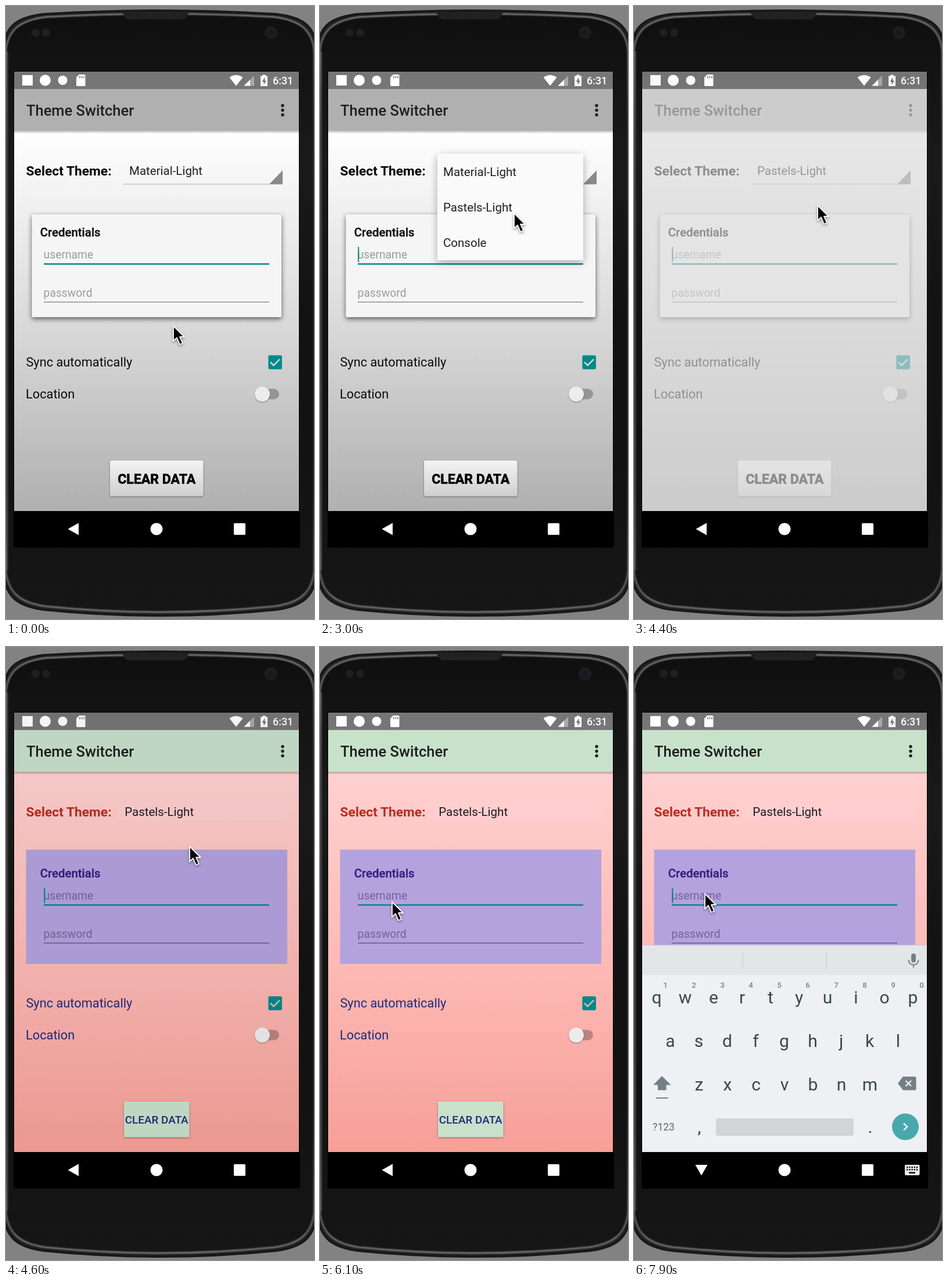
Recreate the animation shown at these times as an HTML page. Size 530 by 1056 pixels, loop 8000 ms.

```html
<!DOCTYPE html>
<html lang="en">
<head>
<meta charset="utf-8">
<title>Theme Switcher</title>
<style>
  html, body { margin: 0; width: 100%; height: 100%; overflow: hidden; background: #828282; }
  svg { display: block; width: 530px; height: 1056px; font-family: Roboto, sans-serif; }
  .card { filter: drop-shadow(0 3px 4px rgba(0, 0, 0, .6)); }
  .button { filter: drop-shadow(0 1.5px 1.5px rgba(0, 0, 0, .4)); }
  .popup { filter: drop-shadow(0 4px 7px rgba(0, 0, 0, .3)); }
  .thumb { filter: drop-shadow(0 1px 1px rgba(0, 0, 0, .35)); }
  .rim { filter: blur(.8px); }
  #pointer { filter: drop-shadow(0 2px 2px rgba(0, 0, 0, .4)); }
</style>
</head>
<body>
<svg id="stage" viewBox="0 0 530 1056"></svg>
<script>
const LOOP = 8000;
const TEAL = '#00898a';

const text = (x, y, size, str, fill, weight = 400, extra = '') =>
  `<text x="${x}" y="${y}" font-size="${size}" font-weight="${weight}" fill="${fill}" ${extra}>${str}</text>`;
const centered = (x, y, size, str, fill, weight, extra = '') =>
  text(x, y, size, str, fill, weight, `text-anchor="middle" ${extra}`);
const rect = (x, y, w, h, fill, extra = '') =>
  `<rect x="${x}" y="${y}" width="${w}" height="${h}" fill="${fill}" ${extra}/>`;
const circle = (x, y, r, fill, extra = '') =>
  `<circle cx="${x}" cy="${y}" r="${r}" fill="${fill}" ${extra}/>`;
const path = (d, fill, extra = '') => `<path d="${d}" fill="${fill}" ${extra}/>`;
const line = (d, color, width, extra = '') =>
  path(d, 'none', `stroke="${color}" stroke-width="${width}" ${extra}`);
const gradient = (id, colors, direction = 'x2="0" y2="1"') =>
  `<linearGradient id="${id}" ${direction}>${colors.map((c, i) =>
    `<stop offset="${i / (colors.length - 1)}" stop-color="${c}"/>`).join('')}</linearGradient>`;

const defs = `<defs>
  ${gradient('lightPage', ['#ffffff', '#dadada', '#b0b0b0'])}
  ${gradient('pastelPage', ['#ffd1d0', '#fdbab6', '#f69f97'])}
  ${gradient('lightButton', ['#f4f4f4', '#cfcfcf'])}
  ${gradient('body', ['#0f0f0f', '#1a1a1a', '#121212', '#121212', '#161616'])}
  ${gradient('rim', ['#8c8c8c', '#3a3a3a', '#303030', '#303030', '#3a3a3a', '#858585'])}
  ${gradient('side', ['#5c5c5c', '#161616'], '')}
  ${gradient('edge', ['rgba(0,0,0,.25)', 'rgba(0,0,0,0)'])}
  <pattern id="mesh" width="4" height="4" patternUnits="userSpaceOnUse">
    ${rect(0, 0, 4, 4, '#161616')}${circle(1, 1, 1, '#343434')}${circle(3, 3, 1, '#343434')}
  </pattern>
  <clipPath id="screen">${rect(14, 113, 490, 757, '#000')}</clipPath>
</defs>`;

function phone() {
  const shell = 'M-3 66C1 34 20 19 66 14Q265 2 464 14C510 19 529 34 533 66V984' +
    'C529 1017 510 1034 464 1040Q265 1060 66 1040C20 1034 1 1017 -3 984Z';
  const rim = 'M0 78C3 41 24 25 68 19Q265 8 462 19C506 25 527 41 530 78V972' +
    'C527 1010 506 1028 462 1034Q265 1054 68 1034C24 1028 3 1010 0 972Z';
  return rect(0, 0, 530, 1056, '#828282') +
    path(shell, '#222', 'stroke="#181818" stroke-width="4"') +
    path(rim, 'url(#body)') +
    rect(0, 78, 5, 894, 'url(#side)') +
    line(rim, 'url(#rim)', 2.4, 'class="rim"') +
    path('M199 10H316L309 21Q307 23 303 23H212Q208 23 206 21Z', 'url(#mesh)') +
    circle(51, 46, 7, '#1f1f1f') + circle(69, 46, 7, '#1f1f1f') +
    circle(456, 46, 11, '#1d1d20') + circle(456, 46, 5, '#17171f') +
    rect(13, 112, 492, 821, '#000');
}

function statusBar() {
  const sd = 'M126 118H135Q136.500 118 136.500 119.500V136.500Q136.500 138 135 138H122.500Q121 138 121 136.500V123Z';
  return rect(14, 113, 490, 30, '#767676') +
    rect(28, 119, 18, 18, '#fff') + circle(67.5, 128, 9.5, '#fff') + circle(97.5, 128, 8, '#fff') +
    path(sd, '#fff') + line('M127 120.500v4M130.500 120.500v4M134 120.500v4', '#767676', 1.5) +
    path('M384.500 123Q396 115 407.500 123L396 137.500Z', '#fff') +
    path('M409.500 137.500L427 120V137.500Z', '#a9a9a9') + path('M409.500 137.500L420 127V137.500Z', '#fff') +
    path('M441.500 118.500H446.500V120.500H450V138H438V120.500H441.500Z', '#fff') +
    path('M445.500 122.500L440.500 130.500H443.500V136L448 128.500H445.500Z', '#767676') +
    text(459, 135, 17.9, '6:31', '#fff', 500);
}

function page(c) {
  const dots = [171.5, 179.5, 187.5].map(y => circle(476, y, 2.7, c.title)).join('');
  return rect(14, 215, 490, 655, `url(#${c.name}Page)`) +
    rect(14, 215, 490, 5, 'url(#edge)') +
    rect(14, 143, 490, 72, c.accent) +
    text(35, 189, 25.5, 'Theme Switcher', c.title, 500) + dots +
    text(34.6, 291.5, 22.8, 'Select Theme:', c.label, 700) +
    c.spinner + c.card +
    text(58.8, 396.5, 20.4, 'Credentials', c.heading, 500, `stroke="${c.heading}" stroke-width=".3"`) +
    text(64.6, 435, 19.3, 'username', c.hint) +
    rect(65, 443.2, 388, 2.5, TEAL) +
    text(64.6, 501, 19.3, 'password', c.hint) +
    rect(65, 509.4, 388, 1.2, c.rule) +
    rect(65.2, 415, 2, 26, TEAL, 'class="caret"') +
    text(34.4, 620.5, 21.8, 'Sync automatically', c.body) +
    rect(451.4, 601.7, 23.5, 24, TEAL, 'rx="2.5"') +
    line('M455 613.500L460.500 619L471 608.500', c.tick, 2.4) +
    text(34, 675.5, 21.8, 'Location', c.body) +
    rect(433, 659.5, 37, 18, c.track, 'rx="9"') +
    circle(441, 668.5, 13, '#ececec', 'class="thumb"') +
    c.button;
}

const light = page({
  name: 'light', accent: '#b0b0b0', title: '#202020', label: '#000', heading: '#0c0c0c',
  hint: '#9c9c9c', rule: '#777', body: '#0c0c0c', tick: '#ddd', track: '#959595',
  spinner: rect(202, 306, 274, 1.5, '#c4c4c4') + path('M476 283V307H453Z', '#8a8a8a') +
    text(212, 291.3, 20.5, 'Material-Light', '#202020', 400, 'id="before"') +
    text(212, 291.3, 20.5, 'Pastels-Light', '#202020', 400, 'id="after"'),
  card: rect(44.5, 359, 429.5, 177, '#f5f5f5', 'rx="2.5" class="card"'),
  button: rect(179, 783, 160.5, 61.5, 'url(#lightButton)', 'rx="3" class="button"') +
    centered(259.2, 823, 23.1, 'CLEAR DATA', '#000', 700, 'stroke="#000" stroke-width=".6"')
});

const pastel = page({
  name: 'pastel', accent: '#c8e1cb', title: '#1c1f1c', label: '#bd2a20', heading: '#30207f',
  hint: '#73639a', rule: '#514573', body: '#212a7a', tick: '#f5b8b3', track: '#bb847f',
  spinner: rect(193, 270, 291, 28, '#ffcfd2', 'opacity=".8"') +
    text(204.2, 291.3, 20.5, 'Pastels-Light', '#1c1c1c'),
  card: rect(34.5, 349, 449.5, 197, '#b3a2de'),
  button: rect(203, 783, 112.5, 61.5, '#c8e1cb', 'class="button"') +
    centered(259.2, 820.5, 18.9, 'CLEAR DATA', '#212a7a', 500)
});

const popup = rect(202, 254, 251, 184, '#fafafa', 'rx="2" class="popup"') +
  ['Material-Light', 'Pastels-Light', 'Console']
    .map((s, i) => text(212, 292.7 + i * 61.3, 20.5, s, '#202020')).join('');

function keyboard() {
  const ink = '#37474f', gray = '#758086';
  const row = (keys, x, y) => [...keys].map((k, i) => centered(x + i * 49, y, 30, k, ink)).join('');
  const digits = [...'1234567890'].map((k, i) => centered(54 + i * 49, 586.5, 13.5, k, '#7b8388', 500)).join('');
  return rect(14, 514, 490, 356, '#eef0f3') + rect(14, 514, 490, 51, '#e3e6e9') +
    rect(14, 513, 490, 1, '#cfc0c8') +
    rect(186.5, 526, 1, 30, '#c3c8cc') + rect(330.5, 526, 1, 30, '#c3c8cc') +
    rect(477, 528, 8, 15.5, gray, 'rx="4"') +
    line('M472.500 539Q473 547.500 481 547.500T489.500 539M481 547V552.500', gray, 2) +
    row('qwertyuiop', 39, 613.5) + digits + row('asdfghjkl', 62.5, 688.5) + row('zxcvbnm', 112, 763.5) +
    path('M48 739L63.500 754.500H55.500V763.500H41V754.500H33Z', gray) + rect(38, 776, 20.5, 2, gray) +
    path('M463 740H483Q485.500 740 485.500 742.500V761Q485.500 763.500 483 763.500H463L454 751.700Z', gray) +
    line('M467.500 747L477 756.500M477 747L467.500 756.500', '#eef0f3', 2.4) +
    centered(51, 833, 17.5, '?123', '#5b686f') +
    centered(112.5, 837, 30, ',', ink) + centered(406.5, 837, 30, '.', ink) +
    rect(141, 812, 237, 30, '#d1d5d8', 'rx="4"') +
    circle(467, 826.5, 23, '#48a9ac') + line('M464 820.500L470 826.500L464 832.500', '#fff', 2.4);
}

function navBar() {
  const keys = [0, 1].map(r => [0, 1, 2, 3, 4].map(k =>
    rect(469 + k * 4.2, 895 + r * 4.2, 2.4, 2.4, '#000')).join('')).join('');
  return rect(14, 870, 492, 63, '#000') +
    path('M106.500 901L125 890.500V911.500Z', '#fff', 'id="back"') +
    `<g id="hide">${path('M105.500 892H126.500L116 910.500Z', '#fff')}
      ${rect(466, 892, 25.5, 18, '#eee', 'rx="2"')}${keys}${rect(473, 904.5, 11, 2.4, '#000')}</g>` +
    circle(259, 901, 10.5, '#fff') + rect(392, 891, 20, 20, '#fff', 'rx="1.5"');
}

const arrow = path('M1 2V28L7 22.500L12 34L17 32L12 21H20Z', '#000',
  'stroke="#fff" stroke-width="1.800" stroke-linejoin="round"');

document.getElementById('stage').innerHTML = defs + phone() + `
  <g clip-path="url(#screen)">
    <g>${light}</g>
    <g id="popup">${popup}</g>
    ${rect(14, 143, 490, 727, '#e2e2e2', 'id="veil"')}
    <g id="pastel">${pastel}</g>
    <g id="keyboard">${keyboard()}</g>
    ${statusBar()}
    ${rect(14, 113, 490, 757, '#000', 'id="dim"')}
  </g>
  ${navBar()}
  <g id="pointer">${arrow}</g>`;

// Each step is [ms, value]; the last value holds until the loop restarts.
function play(selector, prop, steps, easing = 'linear') {
  const frames = [...steps, [LOOP, steps[steps.length - 1][1]]]
    .map(([ms, value]) => ({ offset: ms / LOOP, [prop]: value, easing }));
  document.querySelectorAll(selector).forEach(el =>
    el.animate(frames, { duration: LOOP, iterations: Infinity }));
}
const toggle = (selector, ...times) =>
  play(selector, 'opacity', [[0, 0], ...times.map((ms, i) => [ms, (i + 1) % 2])], 'steps(1, end)');

const at = (x, y) => `translate(${x}px, ${y}px)`;
play('#pointer', 'transform', [
  [0, at(287, 549)], [250, at(287, 549)], [900, at(440, 301)], [1300, at(459, 287)],
  [2300, at(459, 287)], [2850, at(333, 355)], [3150, at(333, 355)], [3400, at(315, 341.5)],
  [5000, at(315, 341.5)], [5850, at(123, 437)], [6150, at(123, 437)], [6450, at(121, 423)]
], 'ease-in-out');

toggle('.caret', 200, 700, 1200, 1700, 2200, 5000, 5500, 6000, 6600, 7100, 7600);
toggle('#after', 3500);
play('#before', 'opacity', [[0, 1], [3500, 0]], 'steps(1, end)');
play('#popup', 'opacity', [[0, 0], [2050, 0], [2250, 1], [3500, 1], [3650, 0]]);
play('#veil', 'opacity', [[0, 0], [4220, 0], [4400, .63], [4500, .85]]);
play('#pastel', 'opacity', [[0, 0], [4420, 0], [4580, 1]]);
play('#dim', 'opacity', [[0, 0], [4220, 0], [4400, .02], [4600, .045], [4800, 0]]);
play('#keyboard', 'opacity', [[0, 0], [6650, 0], [6850, 1]]);
play('#keyboard', 'transform', [[0, at(0, 36)], [6650, at(0, 36)], [6850, at(0, 0)]], 'ease-out');
toggle('#hide', 6700);
play('#back', 'opacity', [[0, 1], [6700, 0]], 'steps(1, end)');
</script>
</body>
</html>
```
